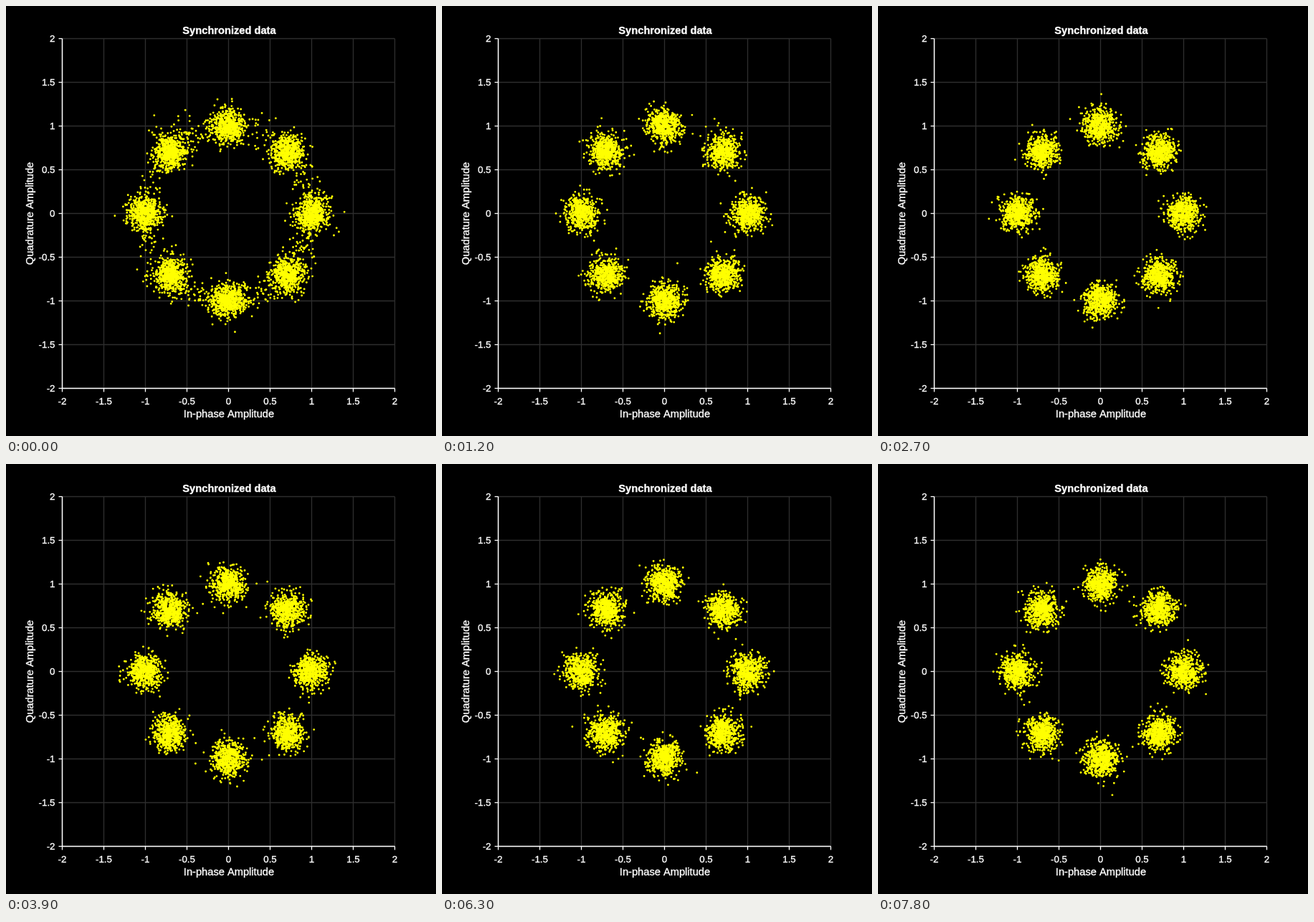
Animation of 600 by 600 pixels, one loop 8 s. Source, as an HTML page with a canvas:

```html
<!DOCTYPE html>
<html lang="en">
<head>
<meta charset="utf-8">
<title>Synchronized data</title>
<style>
  html, body { margin: 0; height: 100%; overflow: hidden; background: #000; }
  canvas { display: block; }
</style>
</head>
<body>
<canvas width="600" height="600"></canvas>
<script>
const LOOP = 8000, STEP = 300;
const PER_CLUSTER = 580, NOISE = 0.097, DOT = 1.45;
// Stray points between neighbouring clusters before the phase has locked
const STRAYS = [80, 50, 85, 85, 55, 90, 100, 90];
const FONT = '"Liberation Sans", Arial, sans-serif';

const ctx = document.querySelector('canvas').getContext('2d');
const px = x => 310.5 + 116 * x;
const py = y => 289.5 - 122 * y;

function randomFrom(seed) {
  return () => {
    seed = (seed + 0x6D2B79F5) | 0;
    let t = Math.imul(seed ^ (seed >>> 15), 1 | seed);
    t = (t + Math.imul(t ^ (t >>> 7), 61 | t)) ^ t;
    return ((t ^ (t >>> 14)) >>> 0) / 4294967296;
  };
}

function line(x1, y1, x2, y2, color, width = 1.3) {
  ctx.strokeStyle = color;
  ctx.lineWidth = width;
  ctx.beginPath();
  ctx.moveTo(x1, y1);
  ctx.lineTo(x2, y2);
  ctx.stroke();
}

// A hairline outline gives the slightly heavy lettering
function text(str, x, y, size, align = 'center', weight = '') {
  ctx.font = `${weight} ${size}px ${FONT}`;
  ctx.textAlign = align;
  ctx.fillStyle = ctx.strokeStyle = '#fff';
  ctx.lineWidth = 0.35;
  ctx.fillText(str, x, y);
  ctx.strokeText(str, x, y);
}

function drawAxes() {
  const left = px(-2), right = px(2), top = py(2), bottom = py(-2);
  ctx.fillStyle = '#000';
  ctx.fillRect(0, 0, 600, 600);
  for (let v = -2; v <= 2; v += 0.5) {
    line(px(v), top, px(v), bottom, '#2e2e2e');
    line(left, py(v), right, py(v), '#2e2e2e');
  }
  for (let v = -2; v <= 2; v += 0.5) {
    line(px(v), bottom, px(v), bottom + 5, '#fff');
    line(left - 5, py(v), left, py(v), '#fff');
    text(v, px(v), 556, 13.333);
    text(v, 68.5, py(v) + 4.5, 13.333, 'right');
  }
  line(left, top, left, bottom + 0.5, '#fff', 1.5);
  line(left - 0.5, bottom, right, bottom, '#fff', 1.5);

  text('Synchronized data', 311.5, 39, 14.667, 'center', 'bold');
  text('In-phase Amplitude', 311, 574, 14.667);
  ctx.save();
  ctx.translate(38, 289.5);
  ctx.rotate(-Math.PI / 2);
  text('Quadrature Amplitude', 0, 0, 14.667);
  ctx.restore();
}

function drawPoints(frame) {
  const random = randomFrom(frame * 7919 + 17);
  const dot = (x, y) => {
    ctx.moveTo(px(x) + DOT, py(y));
    ctx.arc(px(x), py(y), DOT, 0, 7);
  };
  const rayleigh = () => Math.sqrt(-2 * Math.log(1 - random()));

  ctx.fillStyle = '#ff0';
  ctx.beginPath();
  for (let k = 0; k < 8; k++) {
    const phase = k * Math.PI / 4;
    for (let i = 0; i < PER_CLUSTER; i++) {
      const r = NOISE * rayleigh();
      const a = random() * 2 * Math.PI;
      dot(Math.cos(phase) + r * Math.cos(a), Math.sin(phase) + r * Math.sin(a));
    }
    if (frame > 0) continue;
    for (let i = 0; i < STRAYS[k]; i++) {
      const a = phase + random() * Math.PI / 4;
      const r = 1 + 0.09 * rayleigh() * Math.cos(random() * 2 * Math.PI);
      dot(r * Math.cos(a), r * Math.sin(a));
    }
  }
  ctx.fill();
}

let shown = -1;
function tick() {
  const frame = Math.floor(performance.now() % LOOP / STEP);
  if (frame !== shown) {
    shown = frame;
    drawAxes();
    drawPoints(frame);
  }
  requestAnimationFrame(tick);
}
tick();
</script>
</body>
</html>
```
